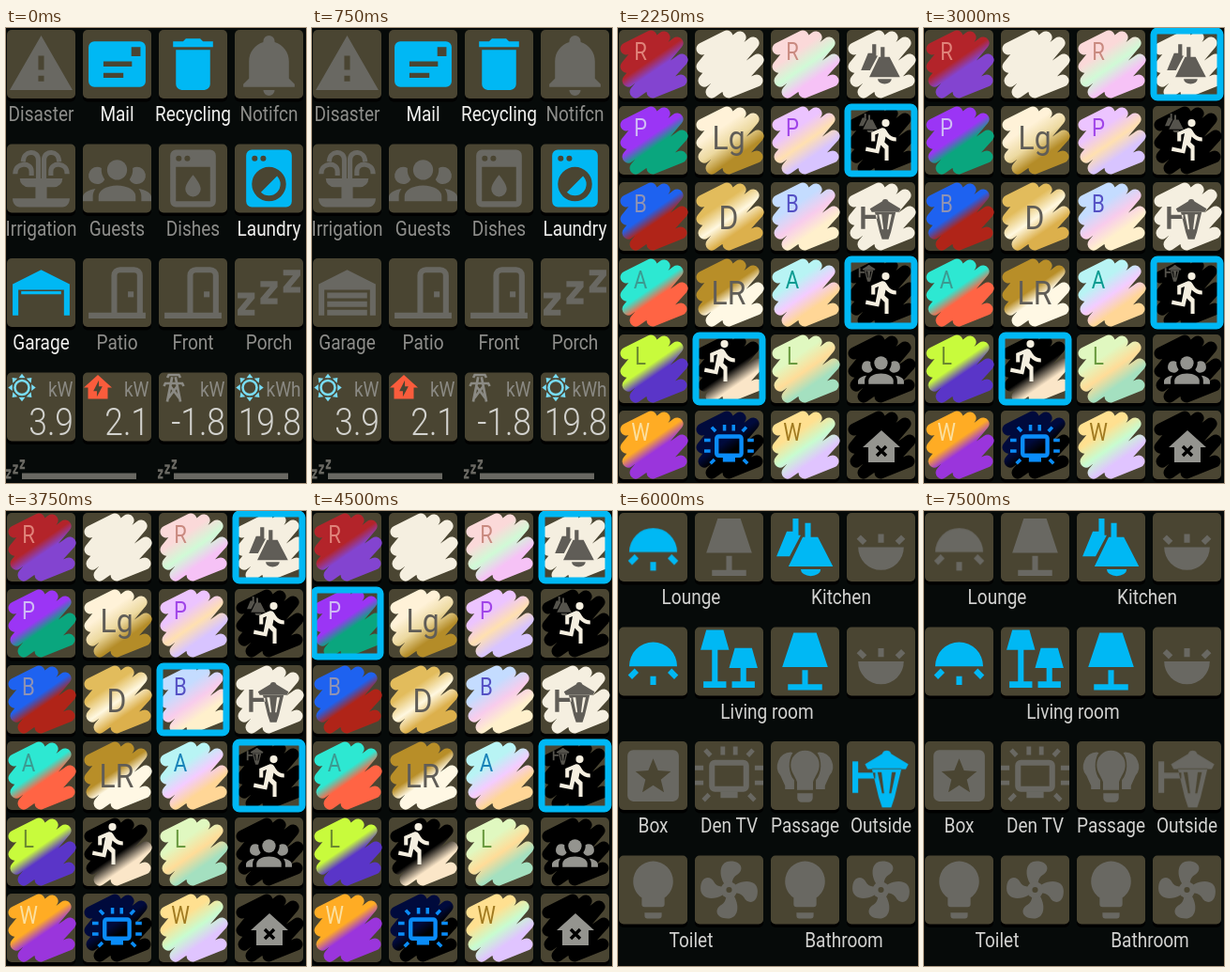
An HTML page that plays this animation: 320x484 px, repeating every 8 s.

```html
<!DOCTYPE html>
<html lang="en">
<head>
<meta charset="utf-8">
<title>Home panel</title>
<style>
html, body { margin: 0; width: 100%; height: 100%; overflow: hidden; background: #060a09; }
svg { display: block; width: 100vw; height: 100vh; }
text { font-family: Roboto, "Open Sans", sans-serif; }
</style>
</head>
<body>
<svg id="stage" viewBox="0 0 320 484"></svg>
<script>
const LOOP = 8000;
const BLUE = '#00b8f4', GREY = '#696862', CELL = '#4a4532', CREAM = '#f5efe0', DARK = '#605d57';
const columns = [1, 82, 163, 244];
const rows = [2, 123.5, 245, 366.5];
const windows = new Map();

// Shows the markup only between two times of the loop.
function during(from, to, markup) {
  const name = `w${from}to${to}`;
  const pct = t => t / LOOP * 100 + '%';
  windows.set(name, `@keyframes ${name}{0%{opacity:${from ? 0 : 1}}` +
    `${pct(from)}{opacity:1}${pct(to)}{opacity:${to < LOOP ? 0 : 1}}}`);
  return `<g style="animation:${name} ${LOOP}ms step-end infinite">${markup}</g>`;
}

const at = (x, y, markup, scale = 1) =>
  `<g transform="translate(${x} ${y}) scale(${scale})">${markup}</g>`;
const solid = (d, color = 'currentColor') => `<path d="${d}" fill="${color}" fill-rule="evenodd"/>`;
const line = (d, width = 2, color = 'currentColor') =>
  `<path d="${d}" fill="none" stroke="${color}" stroke-width="${width}"/>`;
const disc = (x, y, r, color = 'currentColor') => `<circle cx="${x}" cy="${y}" r="${r}" fill="${color}"/>`;
const mirrored = part => part + `<g transform="matrix(-1 0 0 1 24 0)">${part}</g>`;
const spun = (part, count) => Array.from({length: count}, (_, i) =>
  `<g transform="rotate(${i * 360 / count} 12 12)">${part}</g>`).join('');
const dot = (x, y) => `M${x - 1} ${y}a1 1 0 0 1 2 0 1 1 0 0 1-2 0z`;

// Condensed look for every label.
const text = (x, y, str, size, color, anchor = 'middle', weight = 400) =>
  `<text transform="translate(${x} ${y}) scale(.885 1)" font-size="${size}" font-weight="${weight}"` +
  ` fill="${color}" text-anchor="${anchor}">${str}</text>`;

const machine = 'M6 2h12a2 2 0 0 1 2 2v16a2 2 0 0 1-2 2H6a2 2 0 0 1-2-2V4a2 2 0 0 1 2-2z' + dot(7, 5) + dot(10, 5);
const bulb = 'M12 2a7 7 0 0 0-7 7c0 2.38 1.19 4.47 3 5.74V17a1 1 0 0 0 1 1h6a1 1 0 0 0 1-1v-2.26c1.81-1.27 3-3.36 3-5.74a7 7 0 0 0-7-7M9 21a1 1 0 0 0 1 1h4a1 1 0 0 0 1-1v-1H9z';
const garage = 'M22 9v11h-2v-9H4v9H2V9l10-5z';
const house = 'M12 3l10 9h-3v8H5v-8H2z';

// All icons live on a 24-unit grid.
const icons = {
  alert: solid('M1 21h22L12 2zM13 18h-2v-2h2zM13 14h-2V9h2z'),
  letter: solid('M4 4h16a2 2 0 0 1 2 2v12a2 2 0 0 1-2 2H4a2 2 0 0 1-2-2V6a2 2 0 0 1 2-2zM17 6v3.2h3.2V6zM7.2 11v1.8h10V11zM7.2 15v1.8h7V15z'),
  mailbox: solid('M17 4H7a5 5 0 0 0-5 5v11h18a2 2 0 0 0 2-2V9a5 5 0 0 0-5-5M10 18H4V9a3 3 0 0 1 6 0zM20 18h-8V9c0-1.08-.35-2.14-1-3h6a3 3 0 0 1 3 3zM13 13v-2h6v4h-2v-2z'),
  bin: solid('M19 4h-3.5l-1-1h-5l-1 1H5v2h14M6 19a2 2 0 0 0 2 2h8a2 2 0 0 0 2-2V7H6z'),
  bell: solid('M21 19v1H3v-1l2-2v-6c0-3.1 2.03-5.83 5-6.71V4a2 2 0 0 1 4 0v.29c2.97.88 5 3.61 5 6.71v6zM14 21a2 2 0 0 1-4 0z'),
  fountain: mirrored(line('M11 12V5.5C11 2 5.7 2 5.7 6.2M8.6 11V9.5C8.6 6.2 2.9 6.2 2.9 10.4', 1.7)) +
    solid('M4.5 12h15a3 3 0 0 1-3 3H14v4h8c0 1.8-1 3-2.5 3h-15C3 22 2 20.8 2 19h8v-4H7.5a3 3 0 0 1-3-3z'),
  group: disc(12, 9, 3.5) + solid('M5.5 18.25c0-2.07 2.91-3.75 6.5-3.75s6.5 1.68 6.5 3.75V20h-13z') +
    mirrored(solid('M5 8c.56 0 1.08.15 1.53.42-.15 1.43.27 2.85 1.13 3.96A3 3 0 1 1 5 8M0 20v-1.5c0-1.39 1.89-2.56 4.45-2.9-.59.68-.95 1.62-.95 2.65V20z')),
  dishes: solid(machine + 'M6 8v12h12V8zM14.7 15.7a2.7 2.7 0 0 1-5.4 0C9.3 13.9 12 10.8 12 10.8s2.7 3.1 2.7 4.9z'),
  laundry: solid(machine + 'M12 8a6 6 0 0 0 0 12 6 6 0 0 0 0-12zM14.83 11.17a4 4 0 0 1-5.66 5.66z'),
  garageOpen: solid(garage + 'M19 12.6H5v-1.1h14z'),
  garageShut: solid(garage + 'M5 12h14v2H5zM5 15h14v2H5zM5 18h14v2H5z'),
  door: line('M2 20h20M11 20V6a2 2 0 0 1 2-2h5a2 2 0 0 1 2 2v14') + solid('M15.8 11.6h2v2h-2z'),
  sleep: ['M17 4', 'M9 8', 'M1 12'].map(start =>
    solid(start + 'h6v2l-3.38 4H' + (+start.slice(1).split(' ')[0] + 6) + 'v2h-6v-2l3.39-4h-3.39z')).join(''),
  sun: `<circle cx="12" cy="12" r="5" fill="none" stroke="currentColor" stroke-width="1.7"/>` +
    spun(solid('M12 2.2l2.3 3h-4.6z'), 8),
  power: solid(house + 'M11.3 18.5v-4H8.8l3.9-7.7v4.4h2.5z'),
  pylon: line('M7.4 5l1-2h7.2l1 2M5 11l1-2h12l1 2M10.8 4.5L7.3 22M13.2 4.5L16.7 22M9.5 11l6.4 8.5M14.5 11l-6.4 8.5', 1.8),
  run: disc(13.49, 3.48, 2) + solid('M9.89 19.38l1-4.4 2.1 2v6h2v-7.5l-2.1-2 .6-3c1.3 1.5 3.3 2.5 5.5 2.5v-2c-1.9 0-3.5-1-4.3-2.4l-1-1.6c-.4-.6-1-1-1.7-1-.3 0-.5.1-.8.1l-5.2 2.2v4.7h2v-3.4l1.8-.7-1.6 8.1-4.9-1-.4 2z'),
  dome: solid('M3.6 13.7a8.4 8.4 0 0 1 16.8 0zM11 17.2h2v3h-2z') + mirrored(line('M6.2 15.2l-2.3 2.3')),
  bowl: solid('M4 12a8 8 0 0 0 16 0zM11 7.4h2v3h-2z') + mirrored(line('M6.3 10.5L4.2 8.4')),
  lamp: solid('M8 2h8l4 12H4zM11 15h2v5h5v2H6v-2h5z'),
  lamps: solid('M4 1h6l2 7H2zM6 8h2v11h3v2.2H3V19h3zM14 7.3h6l2 7H12zM16 14.3h2V19h3v2.2h-8V19h3z'),
  pendants: solid('M9.7 2h-2v4.5H5.6L2 15.2h4.6l3.9-7.4h-.8zM12 3.5h2v5h2.5l5.3 10.2H6.2l5-10.2h.8zM10.5 19.7h7a3.5 2.4 0 0 1-7 0z'),
  star: solid('M5 3h14a2 2 0 0 1 2 2v14a2 2 0 0 1-2 2H5a2 2 0 0 1-2-2V5a2 2 0 0 1 2-2zM12 6l1.7 4.2 4.5.3-3.5 2.9 1.1 4.4-3.8-2.4-3.8 2.4 1.1-4.4-3.5-2.9 4.5-.3z'),
  tv: '<rect x="6" y="7.5" width="12" height="9.2" rx="1" fill="none" stroke="currentColor" stroke-width="2"/>' +
    solid('M9 17.5h6v2.3H9z') +
    mirrored(line('M9.8 1.8v3M5.5 5L3.6 3M3 9.3H0M3 14.5H0M5 18.6l-2 2', 1.6)),
  bulbs: mirrored(solid('M7 3.8A5 5 0 0 0 3.4 12L5 15.5v1.3h3.2v-3.2C6 11 6 6.5 7.7 4z')) +
    solid('M12 3.2a5 5 0 0 0-5 5c0 2.6 1.5 3.8 2.2 6V17h5.6v-2.8c.7-2.2 2.2-3.4 2.2-6a5 5 0 0 0-5-5zM9.3 18.2h5.4v1.6a1.5 1.5 0 0 1-1.5 1.5h-2.4a1.5 1.5 0 0 1-1.5-1.5z'),
  lantern: solid('M2 7h2v4h6v2H4v5H2zM12.4 4.4a1.7 1.7 0 0 1 3.2 0l6 3.6-.9 1.7H7.3L6.4 8zM8.8 9.5h10.4l-2.4 10-1.2 3.6h-3.2l-1.2-3.6zM10.8 10.8l1.6 7.4h.7l-.9-7.4zM17.2 10.8l-1.6 7.4h-.7l.9-7.4z'),
  bulb: solid(bulb),
  fan: spun(solid('M12.5 2c4.5 0 4.59 3.57 2.23 4.75-.99.49-1.43 1.54-1.62 2.47L12 12l-1.86-2.35C8.15 5.96 8.94 2 12.5 2z'), 4) +
    disc(12, 12, 2.9) + disc(12, 12, 1, CELL),
  away: solid(house) + line('M9.5 11.5l5 5m0-5l-5 5', 1.7, '#000')
};

const icon = (name, color, scale = 73 / 24, x = 0, y = 0) =>
  `<g color="${color}">${at(x, y, icons[name], scale)}</g>`;
const plate = `<rect y="2" width="73" height="74.5" rx="5" fill="#000"/>
  <rect width="73" height="73" rx="5" fill="${CELL}"/>`;
const tile = (col, row, markup) => at(columns[col], rows[row], plate + markup);

function statusPage() {
  const off = name => icon(name, GREY), on = name => icon(name, BLUE);
  const label = (str, lit) => text(36.5, 97, str, 21.5, lit ? '#f0f0ee' : '#8e8e8b');
  const still = (name, str, lit) => icon(name, lit ? BLUE : GREY) + label(str, lit);
  const toggled = (open, shut, str, end) =>
    during(0, end, on(open) + label(str, true)) + during(end, LOOP, off(shut) + label(str));
  const meter = (name, color, unit, value) =>
    icon(name, color, 1.5, -2, -2) + text(70.5, 25, unit, 21.5, '#8b8a84', 'end') +
    text(71, 66, value, 40, '#d2d2ce', 'end', 300);
  const tiles = [
    still('alert', 'Disaster'), toggled('letter', 'mailbox', 'Mail', 1500),
    still('bin', 'Recycling', true), still('bell', 'Notifcn'),
    still('fountain', 'Irrigation'), still('group', 'Guests'),
    still('dishes', 'Dishes'), still('laundry', 'Laundry', true),
    toggled('garageOpen', 'garageShut', 'Garage', 750), still('door', 'Patio'),
    still('door', 'Front'), still('sleep', 'Porch'),
    meter('sun', '#78dcf4', 'kW', '3.9'), meter('power', '#fa5c3c', 'kW', '2.1'),
    meter('pylon', '#8b8a84', 'kW', '-1.8'), meter('sun', '#78dcf4', 'kWh', '19.8')
  ];
  const slider = x => at(x, 0, `<g color="${GREY}" transform="translate(-1 454) scale(.92 1.28)">${icons.sleep}</g>
    <rect x="17" y="473.5" width="122" height="6.5" fill="${GREY}"/>`);
  return tiles.map((t, i) => tile(i % 4, i >> 2, t)).join('') + slider(0) + slider(162);
}

let gradients = 0;
function scribble(colors) {
  const id = 'g' + gradients++;
  const stops = {1: [0], 2: [.4, .6], 3: [.22, .52, .8]}[colors.length];
  return `<linearGradient id="${id}" gradientUnits="userSpaceOnUse" x1="20" y1="12" x2="54" y2="62">` +
    colors.map((c, i) => `<stop offset="${stops[i]}" stop-color="${c}"/>`).join('') + `</linearGradient>
    <path d="M8 20L34 7 8 39 48 8 10 54 62 14 18 66 67 32 36 66 66 54" fill="none" stroke="url(#${id})"
      stroke-width="13" stroke-linecap="round" stroke-linejoin="round"/>`;
}

function scenePage() {
  const cell = (col, row, colors, extra) => at(columns[col], 2 + row * 81, plate + scribble(colors) + extra);
  const initial = (str, color) => text(23, 32, str, 25, color);
  const name = (str, y) => text(36, y, str, 36, DARK);
  const runner = (x, y) => icon('run', CREAM, 2.04, x, y);
  const vivid = [
    ['R', '#e0837a', '#b3242a', '#8344d0'], ['P', '#d0bcf5', '#9b35f5', '#0aa67e'],
    ['B', '#8f93b4', '#1e62f0', '#b02418'], ['A', '#3b9a90', '#2de8d2', '#ff6444'],
    ['L', '#6b8a30', '#c8fb3c', '#5a35c8'], ['W', '#fbe0a0', '#ffac24', '#9a35dc']
  ];
  const pastel = [
    ['R', '#c98a80', '#fbd9d9', '#d0fad6', '#f6c2f6'], ['P', '#a045e8', '#ecc4ff', '#ffe0b0', '#d8c4ff'],
    ['B', '#5450c4', '#c4dcff', '#f8ccec', '#fff0cc'], ['A', '#0a9a90', '#b8f4f4', '#f4ccff', '#ffd696'],
    ['L', '#6a9a40', '#e0f8c0', '#ffdc98', '#a4e0c0'], ['W', '#a07a20', '#ffe090', '#c8fcd0', '#e0c4ff']
  ];
  const letters = (list, col) => list.map(([str, color, ...mix], row) => {
    const mark = str === 'A' && col === 2
      ? during(0, 3750, initial(str, color)) + during(3750, LOOP, initial(str, '#1882b8'))
      : initial(str, color);
    return cell(col, row, mix, mark);
  }).join('');
  const black = ['#000'];
  const selected = (col, row, from, to) => during(from, to, at(columns[col], 2 + row * 81,
    `<rect x="1" y="1" width="71" height="71" rx="4" fill="none" stroke="${BLUE}" stroke-width="7"/>`));
  return letters(vivid, 0) + letters(pastel, 2) +
    cell(1, 0, [CREAM], '') +
    cell(1, 1, ['#fff2d8', '#ecd9a0', '#b48c28'], name('Lg', 46)) +
    cell(1, 2, ['#e2bc5c', '#fff8e0', '#dcb04c'], name('D', 50)) +
    cell(1, 3, ['#b88e28', '#fff8e4'], name('LR', 49)) +
    cell(1, 4, ['#000', '#000', '#fbe6c8'], runner(4, 3)) +
    cell(1, 5, ['#000a3c', '#000'], icon('tv', '#0a8cf8', 2.2, 10, 11)) +
    cell(3, 0, [CREAM], icon('pendants', DARK, 2.1, 11, 11)) +
    cell(3, 1, black, icon('pendants', '#55534c', 1, 11, 6) + runner(14, 11)) +
    cell(3, 2, [CREAM], icon('lantern', DARK, 2.15, 11, 11)) +
    cell(3, 3, black, icon('lantern', '#55534c', .9, 11, 4) + runner(14, 12)) +
    cell(3, 4, black, icon('group', '#94948f', 2.04, 12, 12)) +
    cell(3, 5, black, icon('away', '#94948f', 2, 13, 15)) +
    selected(3, 3, 2250, 6000) + selected(3, 1, 2250, 3000) + selected(3, 0, 3000, 6000) +
    selected(1, 4, 2250, 3750) + selected(2, 2, 3750, 4500) +
    selected(0, 1, 4500, 5250) + selected(1, 1, 5250, 6000);
}

function lightsPage() {
  const off = name => icon(name, GREY), on = name => icon(name, BLUE);
  const until = (name, end) => during(0, end, on(name)) + during(end, LOOP, off(name));
  const tiles = [
    until('dome', 7500), off('lamp'), on('pendants'), off('bowl'),
    on('dome'), on('lamps'), on('lamp'), off('bowl'),
    off('star'), off('tv'), off('bulbs'), until('lantern', 6750),
    off('bulb'), off('fan'), off('bulb'), off('fan')
  ];
  const labels = [
    ['Lounge', 78, 0], ['Kitchen', 238, 0], ['Living room', 159, 1],
    ['Box', 37.5, 2], ['Den TV', 118.5, 2], ['Passage', 199.5, 2], ['Outside', 280.5, 2],
    ['Toilet', 78, 3], ['Bathroom', 241, 3]
  ];
  return tiles.map((t, i) => tile(i % 4, i >> 2, t)).join('') +
    labels.map(([str, x, row]) => text(x, rows[row] + 97, str, 21.5, '#d2d2d0')).join('');
}

document.getElementById('stage').innerHTML =
  during(0, 2250, statusPage()) + during(2250, 6000, scenePage()) + during(6000, LOOP, lightsPage());
const sheet = document.createElement('style');
sheet.textContent = [...windows.values()].join('\n');
document.head.append(sheet);
</script>
</body>
</html>
```
